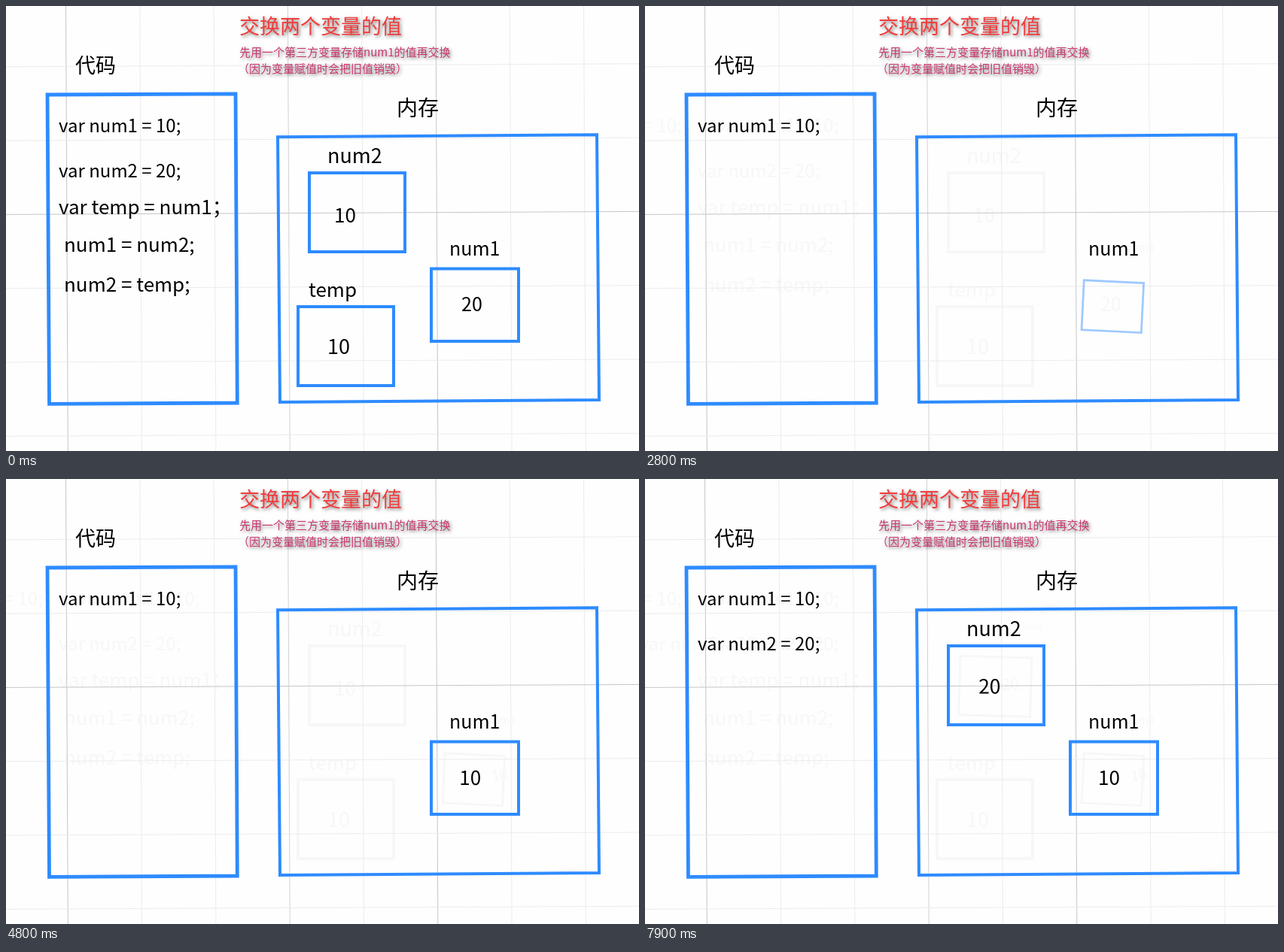
An HTML page with a canvas that plays this animation: 841x592 px, repeating every 8 s.

```html
<!DOCTYPE html>
<html lang="zh-CN">
<head>
<meta charset="utf-8">
<style>
  html, body { margin: 0; width: 100%; height: 100%; overflow: hidden; background: #fefefe; }
  canvas { display: block; }
</style>
</head>
<body>
<canvas id="stage" width="841" height="592"></canvas>
<script>
const ctx = document.getElementById('stage').getContext('2d');
const LOOP = 8000, STEP = 100, INTRO_END = 1100;
const BLUE = '#2e8bff', GHOST = '#f7f7f7', FONT = '"Noto Sans CJK SC", "Noto Sans CJK", "Noto Sans", sans-serif';

// Items: text as [string, ink left, baseline, size], box as [left, top, right, bottom]
const rows = [
  ['var num1 = 10;', 70, 168, 24], ['var num2 = 20;', 70, 228, 24],
  ['var temp = num1;', 70, 277, 26], ['num1 = num2;', 79, 327, 26], ['num2 = temp;', 79, 380, 26],
];
rows[2][0] = 'var temp = num1\uFF1B';
const label1 = ['num1', 591, 332, 25], label2 = ['num2', 429, 209, 27], labelT = ['temp', 402, 387, 26];
const box1 = [565, 349.5, 681, 446], box2 = [403, 222, 530, 327], boxT = [388, 400, 515, 505];
const end1 = ['20', 605, 406, 25], end2 = ['10', 438, 288, 26], endT = ['10', 429, 463, 27];

// Each declaration plays row, label, box and value in turn; marks are the times of faint leftovers
const groups = [
  { start: 1146, row: rows[0], label: label1, box: box1, value: ['10', 604, 407, 26], old: end1,
    marks: [0.354, 0.954, 1.654, 2.554] },
  { start: 4794, row: rows[1], label: label2, box: box2, value: ['20', 440.5, 286, 27], old: end2,
    marks: [0.406, 0.906, 1.706, 2.606] },
];

const clamp = v => Math.max(0, Math.min(1, v));
const outCubic = p => 1 - (1 - p) ** 3;
const outExpo = p => p >= 1 ? 1 : 1 - 2 ** (-10 * p);

function text([str, x, y, size], color = '#000') {
  ctx.font = `${size}px ${FONT}`;
  ctx.fillStyle = color;
  ctx.fillText(str, x + ctx.measureText(str).actualBoundingBoxLeft, y);
}

function outline(points, width, color = BLUE) {
  ctx.strokeStyle = color;
  ctx.lineWidth = width;
  ctx.beginPath();
  points.forEach(([x, y]) => ctx.lineTo(x, y));
  ctx.closePath();
  ctx.stroke();
}

function box([l, t, r, b], color) {
  outline([[l, t], [r, t], [r, b], [l, b]], 4, color);
}

function posed(x, y, scale, degrees, alpha, draw) {
  ctx.save();
  ctx.globalAlpha = alpha;
  ctx.translate(x, y);
  ctx.rotate(degrees * Math.PI / 180);
  ctx.scale(scale, scale);
  draw();
  ctx.restore();
}

// Fly in from the left and bounce
function rowShift(t) {
  const keys = [[0, -3000], [0.6, 25], [0.75, -10], [0.9, 5], [1, 0]];
  const i = keys.findIndex(k => t < k[0]);
  if (i < 1) return i ? 0 : -3000;
  const [t0, x0] = keys[i - 1], [t1, x1] = keys[i];
  return x0 + (x1 - x0) * outCubic((t - t0) / (t1 - t0));
}

function drawRow(g, t, color) {
  const [str, x, y, size] = g.row;
  text([str, x + rowShift(t), y, size], color);
}

// Grow out of a point on the right
function drawLabel(g, t, color) {
  if (t < 0.85) return;
  const [str, x, y, size] = g.label;
  const s = outExpo((t - 0.85) / 0.8), rest = 1 - s;
  posed(x + 117 * rest, y - 16 * rest, s, 5 * rest, color ? 1 : clamp(s * 1.1),
    () => text([str, 0, 0, size], color));
}

// Zoom from the centre while swinging on the top left corner
function drawBox(g, t, color) {
  if (t < 1.6) return;
  const [l, top, r, b] = g.box, w = r - l, h = b - top;
  const s = Math.min(1, 0.5 + 1.2 * (t - 1.5));
  const swing = clamp((2.45 - t) / 0.52);
  const angle = -3.5 * swing * Math.sin(2 * Math.PI * (t - 1.76) / 0.7);
  posed(l + w * (1 - s) / 2, top + h * (1 - s) / 2, s, angle, color ? 1 : clamp((t - 1.5) * 3),
    () => box([0, 0, w, h], color));
}

// Glide in from the right with a fading tilt
function drawValue(g, t, color) {
  if (t < 2.5) return;
  const [str, x, y, size] = g.value, u = t - 2.5;
  const e = u > 1.2 ? 0 : Math.exp(-4.5 * u);
  const cx = size / 2, cy = size * 0.365;
  posed(x + cx + 50 * e, y - cy - 5 * e, 1 - 0.36 * e, -15 * e * Math.cos(8 * u),
    color ? 1 : clamp(0.3 + u * 3), () => text([str, -cx, cy, size], color));
}

const parts = [drawRow, drawLabel, drawBox, drawValue];

function drawGhosts(time) {
  rows.slice(2).forEach(r => text(r, GHOST));
  text(labelT, GHOST);
  text(endT, GHOST);
  box(boxT, GHOST);
  for (const g of groups) {
    const t = (time - g.start) / 1000, m = g.marks;
    if (t < m[0]) text(g.row, GHOST);
    if (t < m[1] + 0.1) text(g.label, GHOST);
    if (t < m[2]) box(g.box, GHOST);
    if (t < m[3]) text(g.old, GHOST);
    parts.forEach((part, i) => { if (t > m[i] + 0.05) part(g, m[i], GHOST); });
    if (t > 0.65) drawRow(g, 0.6, GHOST);
  }
}

function line(x0, y0, x1, y1, color) {
  ctx.strokeStyle = color;
  ctx.lineWidth = 1;
  ctx.beginPath();
  ctx.moveTo(x0, y0);
  ctx.lineTo(x1, y1);
  ctx.stroke();
}

function drawGrid() {
  const gap = 98.3, light = '#ececec', dark = '#c6c6c6';
  for (let i = 0; i < 8; i++) {
    const x = 79.5 + gap * i;
    line(x, 0, x + 2.8, 592, i % 5 === 0 ? dark : i === 3 ? '#d2d2d2' : light);
  }
  for (let i = 0; i < 6; i++) {
    const y = 80.8 + gap * i;
    line(0, y, 841, y - 4, i === 2 ? dark : light);
  }
}

function drawBase() {
  outline([[55, 118], [305, 116.8], [307.3, 528], [57.5, 529.3]], 4.8);
  outline([[361, 174.2], [785, 171.2], [788, 524], [364, 527]], 4);
  text(['代码', 92, 89, 27]);
  text(['内存', 521, 146, 28]);
  ctx.save();
  ctx.shadowColor = 'rgba(0,0,0,.5)';
  ctx.shadowBlur = 4;
  ctx.shadowOffsetX = ctx.shadowOffsetY = 2;
  text(['交换两个变量的值', 311, 37, 27], '#f23c3c');
  text(['先用一个第三方变量存储num1的值再交换', 310, 67, 15], '#cb3a72');
  text(['（因为变量赋值时会把旧值销毁）', 318, 89, 15], '#cb3a72');
  ctx.restore();
}

function drawFinal() {
  rows.forEach(r => text(r));
  [label1, label2, labelT, end1, end2, endT].forEach(v => text(v));
  [box1, box2, boxT].forEach(b => box(b));
}

function frame(now) {
  const time = Math.floor((now % LOOP) / STEP) * STEP;
  ctx.fillStyle = '#fefefe';
  ctx.fillRect(0, 0, 841, 592);
  if (time >= INTRO_END) drawGhosts(time);
  drawGrid();
  drawBase();
  if (time < INTRO_END) drawFinal();
  else for (const g of groups) {
    const t = (time - g.start) / 1000;
    if (t >= 0) parts.forEach(part => part(g, t));
  }
}

const began = performance.now();
function tick() {
  frame(performance.now() - began);
  requestAnimationFrame(tick);
}
tick();
</script>
</body>
</html>
```
